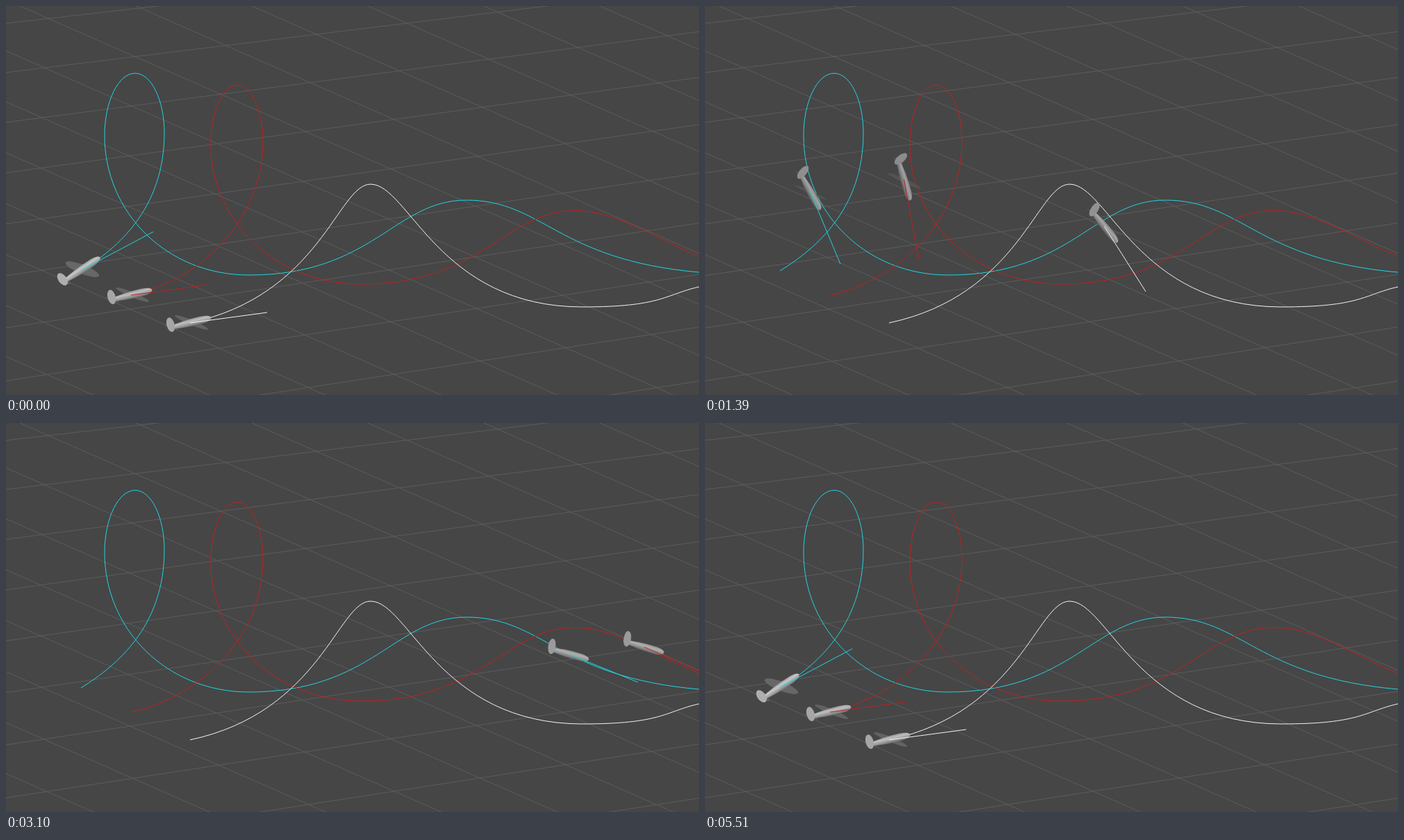
Recreate the animation shown at these times as an HTML page with a canvas. Size 998 px wide and 561 px high, loop 6.07 s.

```html
<!DOCTYPE html>
<html>
<head>
<meta charset="utf-8">
<title>Glider paths</title>
<style>
html, body { margin: 0; width: 100%; height: 100%; overflow: hidden; background: #464646; }
canvas { display: block; }
</style>
</head>
<body>
<canvas id="stage" width="998" height="561"></canvas>
<script>
const W = 998, H = 561, LOOP = 6070;
const ctx = document.getElementById('stage').getContext('2d');

// Screen vectors of one world unit: forward, side (towards the viewer), up
const FWD = [111, -15], SIDE = [58, 26], UP = [0, -121];

// course: x, y, screen angle, handle reach at the turning points
// flight: time, x, y, pitch in degrees
const gliders = [
  {
    color: '#22d4e0',
    course: [[108, 382, 32, 0.3], [228, 183, 90, 0.55], [186, 97, 180, 0.55], [142, 187, 270, 0.55],
      [350, 388, 0, 0.57], [663, 280, 0, 0.33], [998, 384, -5, 0.6]],
    flight: [[0, 108, 381, 20], [80, 133, 362, 33], [700, 237, 146, 108], [960, 184, 84, 180],
      [1240, 134, 180, 262], [1390, 150, 264, 292], [1850, 361, 394, 357], [2480, 633, 281, 3],
      [2950, 757, 313, -23], [3650, 1035, 393, -4]]
  },
  {
    color: '#c21f1f',
    course: [[180, 417, 12, 0.4], [370, 195, 90, 0.55], [333, 114, 180, 0.55], [295, 200, 270, 0.55],
      [512, 401, 0, 0.57], [820, 295, 0, 0.33], [998, 361, -22, 0.35]],
    flight: [[0, 180, 417, 0], [80, 207, 412, 8], [700, 380, 200, 93], [980, 335, 106, 165],
      [1240, 281, 168, 255], [1390, 286, 247, 280], [1850, 462, 413, 347], [2480, 757, 311, 13],
      [2950, 872, 306, -20], [3650, 1110, 390, -8]]
  },
  {
    color: '#f4f4f4',
    course: [[265, 457, 12, 0.65], [525, 257, 0, 0.18], [830, 434, 0, 0.68], [998, 405, 13, 0.3]],
    flight: [[0, 265, 457, 0], [80, 293, 452, 6], [700, 462, 326, 51], [1100, 527, 260, -10],
      [1390, 574, 316, -58], [1850, 738, 439, -19], [2480, 1085, 410, 10]]
  }
];

// Bursts of picture updates: first time, last time, count
const bursts = [[700, 1240, 8], [1320, 1850, 8], [1930, 2480, 8], [2630, 2950, 5], [3100, 3650, 8]];

const rad = deg => deg * Math.PI / 180;
const mix = (a, m, b, n) => [a[0] * m + b[0] * n, a[1] * m + b[1] * n];
const dist = (a, b) => Math.hypot(b[0] - a[0], b[1] - a[1]);
const pitched = a => mix(FWD, Math.cos(a), UP, Math.sin(a));

function flightTime(t) {
  if (t < 380 || t >= 4890) return 0;
  if (t < 700) return 80;
  if (t >= 3650) return null;
  let shown = 700;
  for (const [from, to, n] of bursts) {
    if (t < from) break;
    const step = (to - from) / (n - 1);
    shown = from + step * Math.min(n - 1, Math.floor((t - from) / step + 0.12));
  }
  return shown;
}

// Velocity at a key: its pitch gives the direction, its neighbours the speed
function velocity(keys, i) {
  const p = keys[Math.max(0, i - 1)], k = keys[i], q = keys[Math.min(keys.length - 1, i + 1)];
  const speed = (dist(p.slice(1), k.slice(1)) + dist(k.slice(1), q.slice(1))) / (q[0] - p[0]);
  const f = pitched(rad(k[3]));
  return mix(f, speed / Math.hypot(...f), f, 0);
}

// Position and pitch on the cubic between two keys
function pose(keys, time) {
  const t = Math.min(time, keys[keys.length - 1][0]);
  let i = 0;
  while (i < keys.length - 2 && t >= keys[i + 1][0]) i++;
  const a = keys[i], b = keys[i + 1], d = b[0] - a[0], s = (t - a[0]) / d, r = 1 - s;
  const p0 = a.slice(1, 3), p3 = b.slice(1, 3);
  const p1 = mix(p0, 1, velocity(keys, i), d / 3), p2 = mix(p3, 1, velocity(keys, i + 1), -d / 3);
  const l = mix(p0, r, p1, s), m = mix(p1, r, p2, s), n = mix(p2, r, p3, s);
  const u = mix(l, r, m, s), v = mix(m, r, n, s);
  const dir = mix(v, 1, u, -1), c = dir[0] / FWD[0];
  return [...mix(u, r, v, s), Math.atan2((dir[1] - c * FWD[1]) / UP[1], c)];
}

function line(x1, y1, x2, y2, color) {
  ctx.strokeStyle = color;
  ctx.lineWidth = 1;
  ctx.beginPath();
  ctx.moveTo(x1, y1);
  ctx.lineTo(x2, y2);
  ctx.stroke();
}

function drawGrid() {
  for (let i = 0; i < 11; i++) {
    const j = i - 2;
    line(0, 25 + 70.5 * i + 0.45 * i * i, W, 37 + 65 * j + j * j, '#5c5c5c');
  }
  for (let k = -7; k < 6; k++) {
    const x = 20 + 167 * k;
    line(x, 0, x + H / 0.44, H, '#5c5c5c');
  }
}

// Handle of a course key, as long as its reach along the chord
function handle(key, chord) {
  const dir = [Math.cos(rad(key[2])), -Math.sin(rad(key[2]))];
  const len = key[3] * Math.abs(dir[0] * chord[0] + dir[1] * chord[1]);
  return mix(dir, len, dir, 0);
}

function drawCourse(keys, color) {
  ctx.strokeStyle = color;
  ctx.lineWidth = 1;
  ctx.beginPath();
  ctx.moveTo(keys[0][0], keys[0][1]);
  for (let i = 1; i < keys.length; i++) {
    const a = keys[i - 1], b = keys[i], chord = mix(b, 1, a, -1);
    ctx.bezierCurveTo(...mix(a, 1, handle(a, chord), 1), ...mix(b, 1, handle(b, chord), -1), b[0], b[1]);
  }
  ctx.stroke();
}

// Flat ellipse spanned by two screen vectors
function disc(c, u, v, fill) {
  ctx.save();
  ctx.transform(u[0], u[1], v[0], v[1], c[0], c[1]);
  ctx.beginPath();
  ctx.arc(0, 0, 1, 0, 7);
  ctx.restore();
  ctx.fillStyle = fill;
  ctx.fill();
}

function drawPlane(x, y, pitch) {
  const a = pitch + rad(6), f = pitched(a), n = pitched(a + Math.PI / 2);
  const along = d => mix([x, y], 1, f, d);
  const lit = 0.95 + 0.14 * Math.sin(a);
  const gray = v => `rgb(${v * lit}, ${v * lit}, ${v * lit})`;

  // The wing turns nearly edge-on when the nose points straight up or down
  const chord = 0.025 + 0.045 * Math.cos(a - rad(45)) ** 2;
  disc(along(0.02), mix(f, chord, n, 0), mix(SIDE, 0.4, n, 0), gray(102));
  disc(along(-0.24), mix(f, 0.03, n, 0), mix(SIDE, 0.15, n, 0), gray(94));

  const L = Math.hypot(...f) * 0.285;
  ctx.save();
  ctx.translate(x, y);
  ctx.rotate(Math.atan2(f[1], f[0]));
  const shade = ctx.createLinearGradient(0, -6, 0, 6);
  [145, 198, 158, 100].forEach((v, i) => shade.addColorStop(i / 3, gray(v)));
  ctx.fillStyle = shade;
  ctx.beginPath();
  ctx.moveTo(-L, -1.5);
  ctx.bezierCurveTo(-L * 0.5, -4.5, 0, -6, L * 0.5, -5.4);
  ctx.bezierCurveTo(L * 1.12, -5, L * 1.12, 5, L * 0.5, 5.4);
  ctx.bezierCurveTo(0, 6, -L * 0.5, 4.5, -L, 1.5);
  ctx.fill();
  ctx.restore();

  disc(mix(along(-0.25), 1, n, 0.035), mix(f, 0.05, n, 0), mix(n, 0.09, f, -0.015), gray(172));
}

function draw(now) {
  const t = flightTime(now % LOOP);
  ctx.fillStyle = '#464646';
  ctx.fillRect(0, 0, W, H);
  drawGrid();
  for (const g of gliders) drawCourse(g.course, g.color);
  if (t === null) return;
  for (const g of gliders) {
    const [x, y, pitch] = pose(g.flight, t);
    drawPlane(x, y, pitch);
    line(x, y, ...mix([x, y], 1, pitched(pitch), 1), g.color);
  }
}

const start = performance.now();
function tick() {
  draw(performance.now() - start);
  requestAnimationFrame(tick);
}
tick();
</script>
</body>
</html>
```
